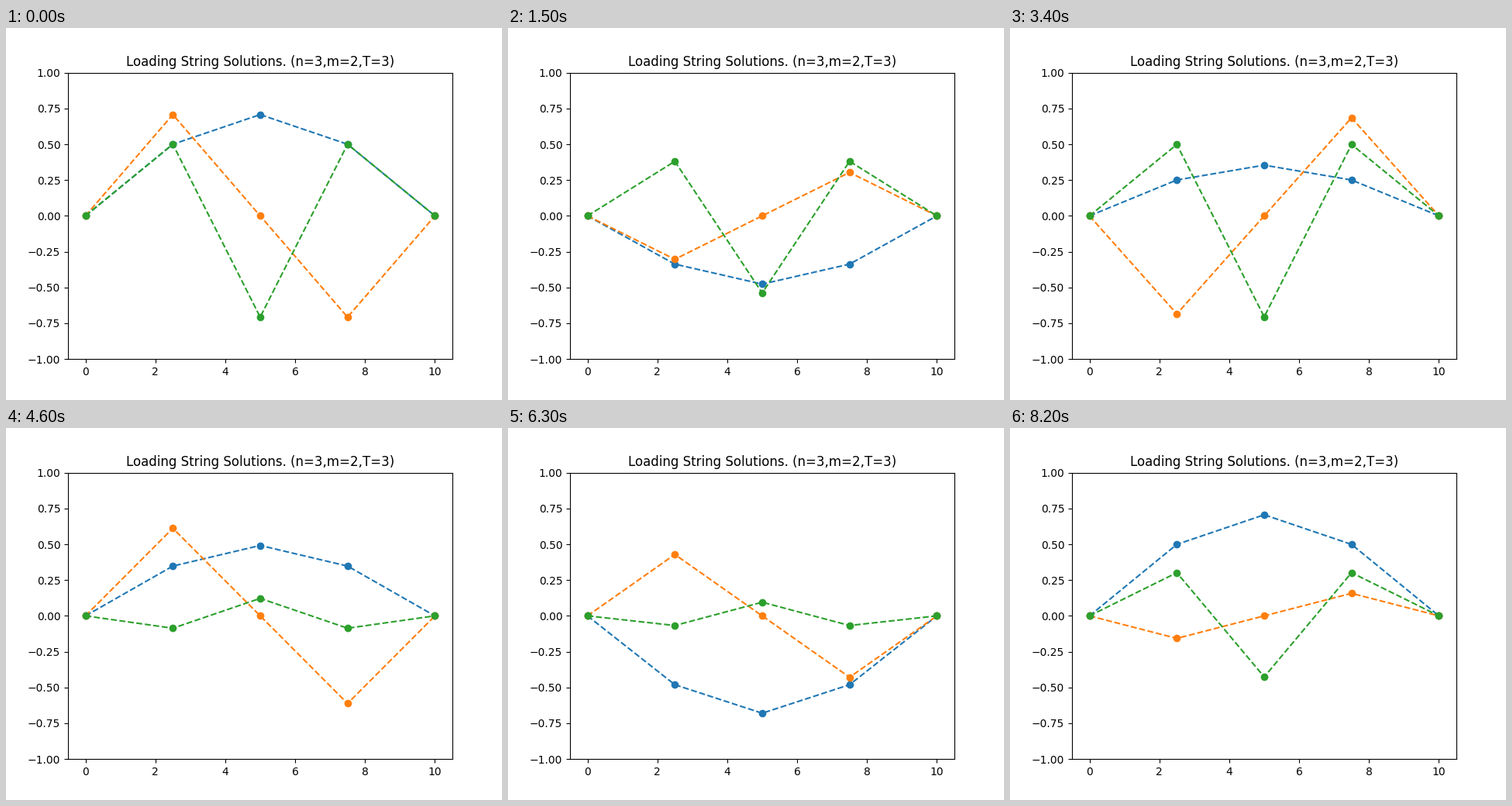
These frames come from a looping animation (640x480 px, 8300 ms). A matplotlib script:

```python
import numpy as np
import matplotlib.pyplot as plt
from matplotlib.animation import FuncAnimation

N, MASS, TENSION, LENGTH = 3, 2, 3, 10
FRAMES, INTERVAL, DT = 83, 100, 0.3

x = np.linspace(0, LENGTH, N + 2)
beads = np.arange(N + 2)
modes = np.arange(1, N + 1)

# Normal modes of a massless string loaded with N equal beads
shapes = np.sqrt(2 / (N + 1)) * np.sin(np.pi * np.outer(modes, beads) / (N + 1))
spacing = LENGTH / N
omega = 2 * np.sqrt(TENSION / (MASS * spacing)) * np.sin(np.pi * modes / (2 * (N + 1)))

fig, ax = plt.subplots(figsize=(6.4, 4.8), dpi=100)
ax.set_xlim(-0.5, 10.5)
ax.set_ylim(-1, 1)
ax.set_title(f"Loading String Solutions. (n={N},m={MASS},T={TENSION})")
lines = [ax.plot(x, shape, "o--")[0] for shape in shapes]


def update(frame):
    swing = np.cos(omega * frame * DT)
    for line, shape, amount in zip(lines, shapes, swing):
        line.set_ydata(shape * amount)
    return lines


anim = FuncAnimation(fig, update, frames=FRAMES, interval=INTERVAL,
                     repeat=True, repeat_delay=0)
plt.show()
```
